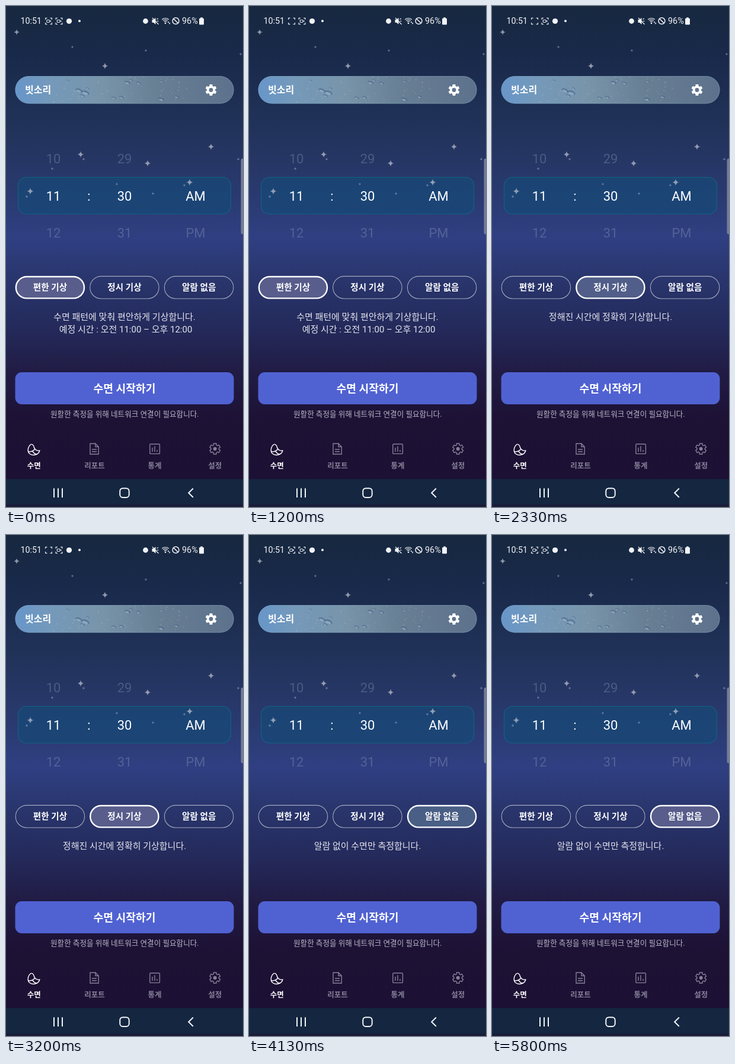
Animation of 400 by 844 pixels, one loop 5870 ms. Source, as an HTML page with a canvas:

```html
<!DOCTYPE html>
<html lang="ko">
<head>
<meta charset="utf-8">
<title>수면</title>
<style>
  html, body { margin: 0; width: 100%; height: 100%; overflow: hidden; background: #16263f; }
  canvas { display: block; width: 400px; height: 844px; }
</style>
</head>
<body>
<canvas id="stage" width="400" height="844"></canvas>
<script>
const ctx = document.getElementById('stage').getContext('2d');
const LOOP = 5870;
const FONT = 'Roboto, "Noto Sans CJK KR", "Noto Sans CJK", sans-serif';
const TAU = Math.PI * 2;

const MODES = [
  { x: 15.8, label: '편한 기상', info: ['수면 패턴에 맞춰 편안하게 기상합니다.', '예정 시간 : 오전 11:00 – 오후 12:00'] },
  { x: 141.3, label: '정시 기상', info: ['정해진 시간에 정확히 기상합니다.'] },
  { x: 267, label: '알람 없음', info: ['알람 없이 수면만 측정합니다.'] }
];
const SWITCHES = [{ at: 2130, mode: 1 }, { at: 4070, mode: 2 }];
const FADE = 330;

// x, y, radius
const STARS = [
  [18, 44, 5], [112, 69, 2.6], [236, 75, 2.6], [167, 101, 5.5], [396, 81, 2.6],
  [346, 237, 5.5], [126, 250, 5.5], [131, 258, 2.6], [239, 265, 5.5], [78, 274, 2.6],
  [392, 258, 2.6], [41, 312, 5.8], [35, 321, 2.8], [187, 300, 2.4], [310, 297, 5.8],
  [301, 302, 2.6], [248, 316, 2.6]
];

function gradient(x0, y0, x1, y1, stops) {
  const g = ctx.createLinearGradient(x0, y0, x1, y1);
  stops.forEach(([p, c]) => g.addColorStop(p, c));
  return g;
}

function fill(color, build, rule = 'nonzero') {
  ctx.beginPath();
  build();
  ctx.fillStyle = color;
  ctx.fill(rule);
}

function stroke(color, width, build) {
  ctx.beginPath();
  build();
  ctx.strokeStyle = color;
  ctx.lineWidth = width;
  ctx.stroke();
}

function poly(...p) {
  ctx.moveTo(p[0], p[1]);
  for (let i = 2; i < p.length; i += 2) ctx.lineTo(p[i], p[i + 1]);
}

function circle(x, y, r) {
  ctx.moveTo(x + r, y);
  ctx.arc(x, y, r, 0, TAU);
}

function text(str, x, y, size, color, weight = 400, align = 'center') {
  ctx.font = `${weight} ${size}px ${FONT}`;
  ctx.textAlign = align;
  ctx.fillStyle = color;
  ctx.fillText(str, x, y);
}

function gear(x, y, inner, outer) {
  for (let k = 0; k < 6; k++) {
    const a = k * TAU / 6 - TAU / 4;
    [[-0.36, inner], [-0.24, outer], [0.24, outer], [0.36, inner]].forEach(([d, r], i) => {
      const px = x + r * Math.cos(a + d), py = y + r * Math.sin(a + d);
      k || i ? ctx.lineTo(px, py) : ctx.moveTo(px, py);
    });
  }
  ctx.closePath();
}

function seeded(seed) {
  return () => (seed = (seed * 16807) % 2147483647) / 2147483647;
}

function background() {
  fill(gradient(0, 0, 0, 797, [
    [0, '#17283f'], [0.1, '#19294a'], [0.25, '#213259'], [0.4, '#2a3a70'], [0.49, '#2f3f82'],
    [0.58, '#29356c'], [0.68, '#242a5b'], [0.77, '#211c45'], [0.88, '#1d1134'], [1, '#1c1034']
  ]), () => ctx.rect(0, 0, 400, 797));
  fill('#142640', () => ctx.rect(0, 797, 400, 47));
  fill('#1a1c38', () => ctx.rect(0, 840, 400, 4));
}

function stars() {
  for (const [x, y, r] of STARS) {
    fill(r > 4 ? 'rgba(190,194,206,.72)' : 'rgba(180,186,204,.5)', () => {
      const c = r * 0.12;
      ctx.moveTo(x, y - r);
      ctx.quadraticCurveTo(x + c, y - c, x + r, y);
      ctx.quadraticCurveTo(x + c, y + c, x, y + r);
      ctx.quadraticCurveTo(x - c, y + c, x - r, y);
      ctx.quadraticCurveTo(x - c, y - c, x, y - r);
    });
  }
}

function captureIcon(x, y, camera) {
  for (const sx of [-1, 1]) for (const sy of [-1, 1]) {
    stroke('#e4e7ec', 1.2, () => poly(
      x + sx * 5.4, y + sy * 2.6, x + sx * 5.4, y + sy * 5.2, x + sx * 2.6, y + sy * 5.2));
  }
  if (!camera) return;
  stroke('#e4e7ec', 1.1, () => ctx.roundRect(x - 3.2, y - 2, 4.6, 4, 0.8));
  fill('#e4e7ec', () => poly(x + 1.6, y, x + 3.8, y - 1.8, x + 3.8, y + 1.8));
}

function statusBar(camera) {
  const white = '#f1f3f6';
  text('10:51', 24.5, 30.2, 14.3, white, 400, 'left');
  captureIcon(72, 25.5, camera);
  captureIcon(89.5, 25.5, true);
  fill(white, () => circle(106.5, 25.5, 4.6));
  fill(white, () => circle(124, 25.3, 2));
  fill(white, () => circle(235.5, 25.5, 4.4));

  // muted speaker
  fill(white, () => poly(246.5, 23, 249, 23, 252.5, 19.8, 252.5, 31, 249, 28, 246.5, 28));
  stroke(white, 1.2, () => {
    poly(247, 20, 257.5, 31);
    poly(254.5, 22.5, 257, 21);
    poly(254.5, 25.5, 257.5, 25.5);
  });

  // wireless
  [3, 5.7, 8.4].forEach(r => stroke('#c9ced6', 1.4, () =>
    ctx.arc(269, 29, r, -TAU * 0.37, -TAU * 0.13)));
  fill(white, () => circle(269, 29, 1.3));
  fill(white, () => {
    poly(272.5, 28, 274, 25.8, 275.5, 28);
    poly(274.5, 28.6, 277.5, 28.6, 276, 31);
  });

  stroke(white, 1.5, () => {
    circle(286.5, 25.2, 5.4);
    poly(282.7, 21.4, 290.3, 29);
  });
  text('96%', 297, 30.2, 14.4, white, 400, 'left');
  fill(white, () => {
    ctx.roundRect(326, 20.8, 8, 10.6, 1.2);
    ctx.rect(328.2, 19.3, 3.6, 1.8);
  });
}

function banner() {
  ctx.save();
  ctx.beginPath();
  ctx.roundRect(15.5, 118, 369, 46.5, 23.2);
  ctx.clip();
  fill(gradient(15, 150, 385, 135, [
    [0, '#6796ca'], [0.17, '#7599b9'], [0.4, '#7894a9'], [0.65, '#687f94'], [1, '#5d718c']
  ]), () => ctx.rect(15, 117, 370, 48));
  const rnd = seeded(71);
  for (let i = 0; i < 75; i++) {
    const x = 70 + rnd() * 235, y = 118 + rnd() * 46;
    fill('rgba(200,218,230,.16)', () => circle(x, y, 0.5 + rnd()));
  }
  const drops = [[123, 142, 6], [134, 146, 7], [129, 151, 4], [138, 139, 3], [182, 155, 4],
    [195, 154, 4], [205, 129, 5], [224, 130, 4], [211, 125, 3], [262, 157, 5],
    [288, 153, 4], [104, 126, 3], [263, 127, 3]];
  for (const [x, y, r] of drops) {
    fill('rgba(62,92,132,.5)', () => ctx.ellipse(x, y, r, r * 0.48, 0.35, 0, TAU));
    fill('rgba(178,202,222,.6)', () => ctx.ellipse(x - 0.5, y + r * 0.2, r * 0.7, r * 0.27, 0.35, 0, TAU));
  }
  ctx.restore();
  stroke('rgba(125,160,185,.55)', 1, () => ctx.roundRect(16, 118.5, 368, 45.5, 22.7));
  text('빗소리', 32, 147, 16, '#fff', 700, 'left');
  fill('#fff', () => {
    gear(346, 141.5, 7.2, 9.8);
    circle(346, 141.5, 3.4);
  }, 'evenodd');
}

function picker() {
  fill('rgba(22,74,120,.68)', () => ctx.roundRect(20.5, 288.5, 359, 62, 14));
  stroke('#12627f', 1.2, () => ctx.roundRect(20.5, 288.5, 359, 62, 14));
}

function pickerText() {
  const dim = 'rgba(170,178,205,.3)';
  text('10', 80, 264.6, 22, dim);
  text('29', 200, 264.6, 22, dim);
  text('12', 80, 390, 22, dim);
  text('31', 200, 390, 22, dim);
  text('PM', 320, 390, 22, dim);
  text('11', 80, 327.6, 22, '#fff');
  text(':', 140, 327.6, 22, '#fff');
  text('30', 200, 327.6, 22, '#fff');
  text('AM', 320, 327.6, 22, '#fff');
  fill('#747c99', () => ctx.roundRect(396.5, 257, 8, 127.5, 3));
}

function modes(active, settled) {
  const from = [74, 95, 134], to = [88, 93, 140];
  const tint = from.map((v, i) => Math.round(v + (to[i] - v) * settled));
  MODES.forEach((m, i) => {
    const on = i === active;
    const box = inset => () => ctx.roundRect(
      m.x + inset, 455 + inset, 117.2 - 2 * inset, 38.4 - 2 * inset, 19.2 - inset);
    if (on) fill(`rgb(${tint})`, box(0.5));
    stroke(on ? '#fff' : '#a4a8bd', on ? 2.4 : 1.1, box(on ? 1 : 0.4));
    text(m.label, m.x + 58.7, 479.4, 14.6, '#fff', 700);
  });
  MODES[active].info.forEach((line, i) =>
    text(line, i ? 202 : 200, 528.6 + i * 21.8, 15, '#e3e4ee'));
}

function startButton() {
  fill('#5062d2', () => ctx.roundRect(15.5, 617, 369, 54, 11));
  text('수면 시작하기', 200, 650.8, 18.2, '#fff', 700);
  text('원활한 측정을 위해 네트워크 연결이 필요합니다.', 200.3, 691.8, 12.6, '#b7b4c4');
}

function tabs() {
  const grey = '#858097';
  stroke('#fff', 1.4, () => {
    ctx.moveTo(42, 738.5);
    ctx.bezierCurveTo(37, 742, 35.5, 750, 39.5, 754);
    ctx.bezierCurveTo(45, 758.5, 55, 756.5, 56.8, 749);
    ctx.bezierCurveTo(52, 749.8, 48, 747, 47.2, 743);
    ctx.bezierCurveTo(46.8, 740, 44.5, 738, 42, 738.5);
    ctx.moveTo(37.2, 750.5);
    ctx.quadraticCurveTo(44, 752, 48.3, 746.8);
    ctx.moveTo(45, 750.5);
    ctx.quadraticCurveTo(48, 755, 52, 755);
  });
  stroke(grey, 1.4, () => {
    poly(151, 737.2, 142, 737.2, 142, 755, 156.2, 755, 156.2, 742.5, 151, 737.2, 151, 742.5, 156.2, 742.5);
    poly(145, 747, 153, 747);
    poly(145, 750.7, 153, 750.7);
  });
  stroke(grey, 1.4, () => {
    ctx.roundRect(242.8, 738, 16.6, 16.4, 1.5);
    poly(247, 744, 247, 751);
    poly(251, 741.5, 251, 751);
    poly(255, 748, 255, 751);
  });
  stroke(grey, 1.4, () => gear(352.7, 746, 6.8, 9.2));
  fill(grey, () => circle(352.7, 746, 3));
  text('수면', 47.3, 778.6, 12.5, '#fff', 700);
  text('리포트', 149.5, 778.6, 12.5, grey, 700);
  text('통계', 251, 778.6, 12.5, grey, 700);
  text('설정', 352.8, 778.6, 12.5, grey, 700);
}

function navBar() {
  stroke('#f2f4f7', 2, () => {
    [81, 88, 95].forEach(x => poly(x, 812.5, x, 828));
    ctx.roundRect(192.3, 812.4, 15.4, 15.6, 4.8);
    poly(315.8, 812.8, 308.2, 820.3, 315.8, 827.8);
  });
}

// The recording indicator is lit for 470 ms and off for 530 ms.
const cameraLit = t => (t + 270) % 1000 < 470;

function draw(t) {
  let active = 0, settled = 1;
  for (const s of SWITCHES) {
    if (t < s.at) continue;
    active = s.mode;
    settled = Math.min(1, Math.max(0, (t - s.at - 70) / (FADE - 70)));
  }
  background();
  picker();
  stars();
  statusBar(cameraLit(t));
  banner();
  pickerText();
  modes(active, settled);
  startButton();
  tabs();
  navBar();
}

let begin = null;
function tick(now) {
  begin ??= now;
  draw((now - begin) % LOOP);
  requestAnimationFrame(tick);
}
draw(0);
requestAnimationFrame(tick);
</script>
</body>
</html>
```
